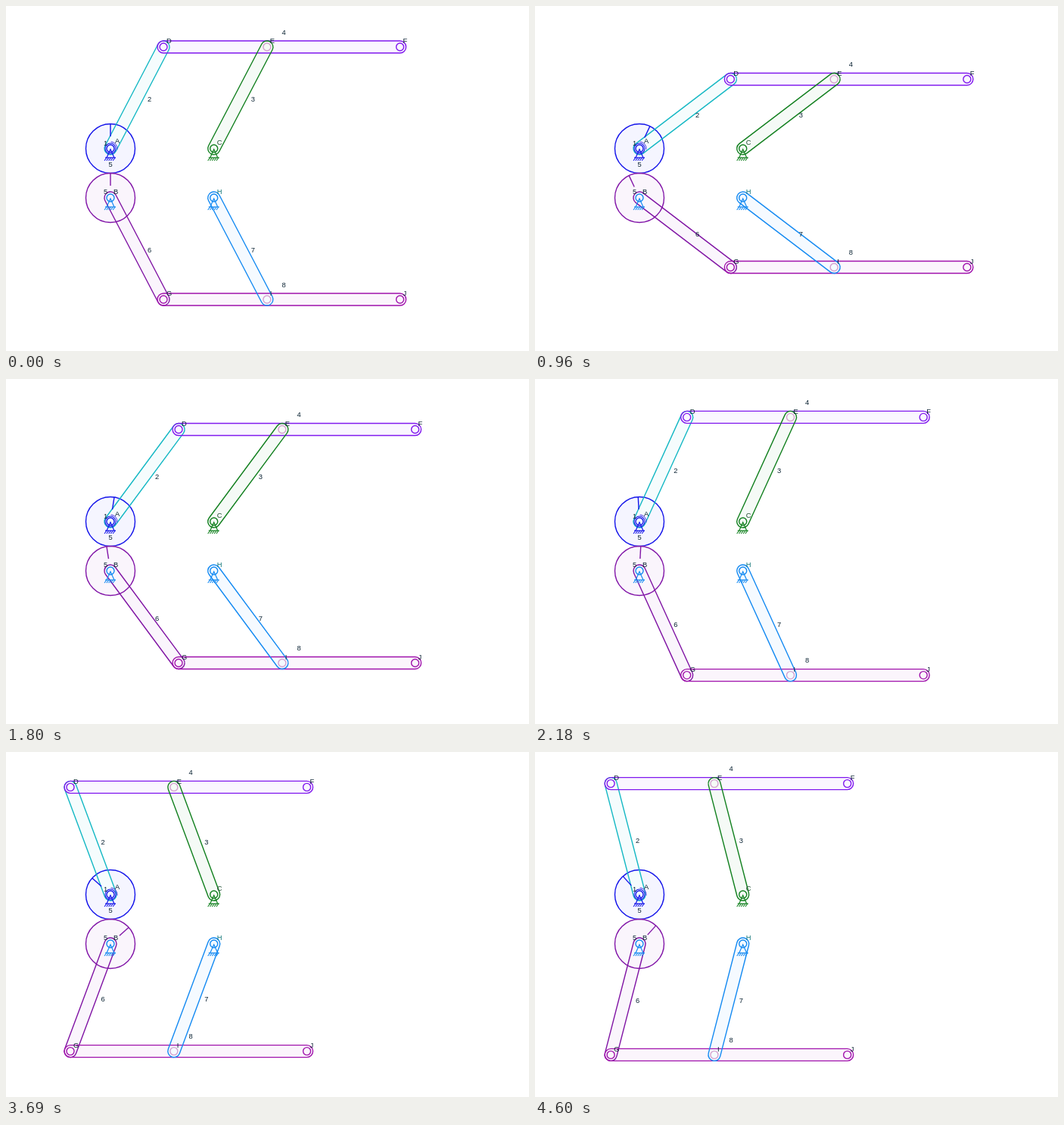
An HTML page with a canvas for the animation above (4690 ms loop, 691 px wide and 455 px high).

```html
<!DOCTYPE html>
<html lang="en">
<head>
<meta charset="utf-8">
<title>Geared parallel linkage</title>
<style>
html, body { margin: 0; width: 100%; height: 100%; overflow: hidden; background: #fff; }
canvas { display: block; }
</style>
</head>
<body>
<canvas id="stage" width="691" height="455"></canvas>
<script>
const ctx = document.getElementById('stage').getContext('2d');
const LOOP = 4690, FIRST_HOLD = 170, STEP = 77.2, LAST_STEP = 58;
const CRANK = 151.2, PITCH = 32.5, ROD = 8, REST = 27.6;
const MID = 136.8, TIP = 312.5, LINE = 1.4;
const A = [138, 188], B = [138, 253], C = [274.7, 188], H = [274.7, 253];
const COLOR = {
  gear: '#1414ea', gear2: '#8216a8', teal: '#14b8c4', green: '#12801f',
  violet: '#8018ee', plum: '#8014a4', sky: '#148af2', magenta: '#a012ac',
  pin: '#d5a0cf', ink: '#0b2333'
};

// Crank swing: [step, degrees from vertical], linear in between
const SWING = [
  [0, REST], [6, 40.6], [13, 57.6], [17, 48.6], [27, 24.5],
  [36, 1.5], [46, -20.5], [51, -32.4], [LAST_STEP, -14.5]
];

// The mechanism advances in discrete steps.
function crankAngle(time) {
  const count = Math.max(0, 1 + Math.floor((time - FIRST_HOLD) / STEP));
  const step = Math.min(count, LAST_STEP);
  const next = Math.max(1, SWING.findIndex(key => key[0] >= step));
  const [s0, a0] = SWING[next - 1], [s1, a1] = SWING[next];
  return a0 + (a1 - a0) * (step - s0) / (s1 - s0);
}

function circle([x, y], radius) {
  const path = new Path2D();
  path.arc(x, y, radius, 0, 2 * Math.PI);
  return path;
}

function rod(p, q) {
  const dir = Math.atan2(q[1] - p[1], q[0] - p[0]);
  const path = new Path2D();
  path.arc(...p, ROD, dir + Math.PI / 2, dir - Math.PI / 2);
  path.arc(...q, ROD, dir - Math.PI / 2, dir + Math.PI / 2);
  path.closePath();
  return path;
}

function stroke(path, color, width = LINE) {
  ctx.strokeStyle = color;
  ctx.lineWidth = width;
  ctx.stroke(path);
}

function tint(path, color) {
  ctx.fillStyle = '#fff';
  ctx.fill(path);
  ctx.globalAlpha = 0.04;
  ctx.fillStyle = color;
  ctx.fill(path);
  ctx.globalAlpha = 1;
}

function line(points, color, width) {
  const path = new Path2D();
  points.forEach(p => path.lineTo(...p));
  stroke(path, color, width);
}

function gearMark([x, y], angle, color) {
  const s = Math.sin(angle), c = Math.cos(angle);
  line([[x + PITCH * s, y - PITCH * c], [x + 16 * s, y - 16 * c]], color);
}

function ground([x, y], color) {
  const base = y + 12;
  stroke(circle([x, y], 5), color);
  line([[x - 5, base], [x, y + 1], [x + 5, base]], color, 1.2);
  line([[x - 7, base], [x + 7, base]], color, 1.2);
  for (let hx = x - 5; hx < x + 7; hx += 2.8) {
    line([[hx, base], [hx - 3, base + 4]], color, 1.1);
  }
}

function label(text, x, y, align = 'center', color = COLOR.ink) {
  ctx.textAlign = align;
  ctx.fillStyle = color;
  ctx.fillText(text, x, y);
}

const jointLabel = (text, p, color) => label(text, p[0] + 4, p[1] - 4.8, 'left', color);
const shift = (p, dx) => [p[0] + dx, p[1]];

function draw(time) {
  const degrees = crankAngle(time);
  const angle = degrees * Math.PI / 180;
  const turn = (degrees - REST) * Math.PI / 180;
  const dx = CRANK * Math.sin(angle), dy = CRANK * Math.cos(angle);
  const D = [A[0] + dx, A[1] - dy], G = [B[0] + dx, B[1] + dy];
  const E = shift(D, MID), F = shift(D, TIP);
  const I = shift(G, MID), J = shift(G, TIP);

  ctx.fillStyle = '#fff';
  ctx.fillRect(0, 0, 691, 455);
  ctx.font = '9.33px "Liberation Sans", Arial, sans-serif';

  const bodies = [
    [circle(A, PITCH), COLOR.gear], [circle(B, PITCH), COLOR.gear2],
    [rod(A, D), COLOR.teal], [rod(D, F), COLOR.violet], [rod(C, E), COLOR.green],
    [rod(B, G), COLOR.plum], [rod(G, J), COLOR.magenta], [rod(H, I), COLOR.sky]
  ];
  bodies.forEach(([path, color]) => tint(path, color));
  bodies.forEach(([path, color]) => stroke(path, color));
  gearMark(A, turn, COLOR.gear);
  gearMark(B, -turn, COLOR.gear2);

  for (const p of [D, F]) stroke(circle(p, 5), COLOR.violet);
  for (const p of [G, J]) stroke(circle(p, 5), COLOR.magenta);
  for (const p of [E, I]) stroke(circle(p, 5), COLOR.pin);

  ground(A, COLOR.gear);
  ground(B, COLOR.sky);
  ground(C, COLOR.green);
  ground(H, COLOR.sky);

  // Drive marker around the powered pivot
  stroke(circle(A, 7), COLOR.gear, 1.1);
  const drive = new Path2D();
  drive.arc(...A, 9, -1.5, 0.15);
  stroke(drive, '#4a30e8', 1);

  label('A', 144, 181, 'left');
  jointLabel('B', B);
  jointLabel('C', C, '#245236');
  jointLabel('H', H, '#147779');
  Object.entries({ D, E, F, G, I, J }).forEach(([name, p]) => jointLabel(name, p));

  label('1', 131.5, 183.5);
  label('5', 138, 212);
  label('5', 131.5, 248);
  const besideX = dx / 2 + 16.5, besideY = dy / 2;
  label('2', A[0] + besideX, A[1] - besideY + 4.8);
  label('3', C[0] + besideX, C[1] - besideY + 4.8);
  label('6', B[0] + besideX, B[1] + besideY + 4.8);
  label('7', H[0] + besideX, H[1] + besideY + 4.8);
  label('4', D[0] + 159, D[1] - 16.2);
  label('8', G[0] + 159, G[1] - 16.2);
}

function frame() {
  draw(performance.now() % LOOP);
  requestAnimationFrame(frame);
}
frame();
</script>
</body>
</html>
```
